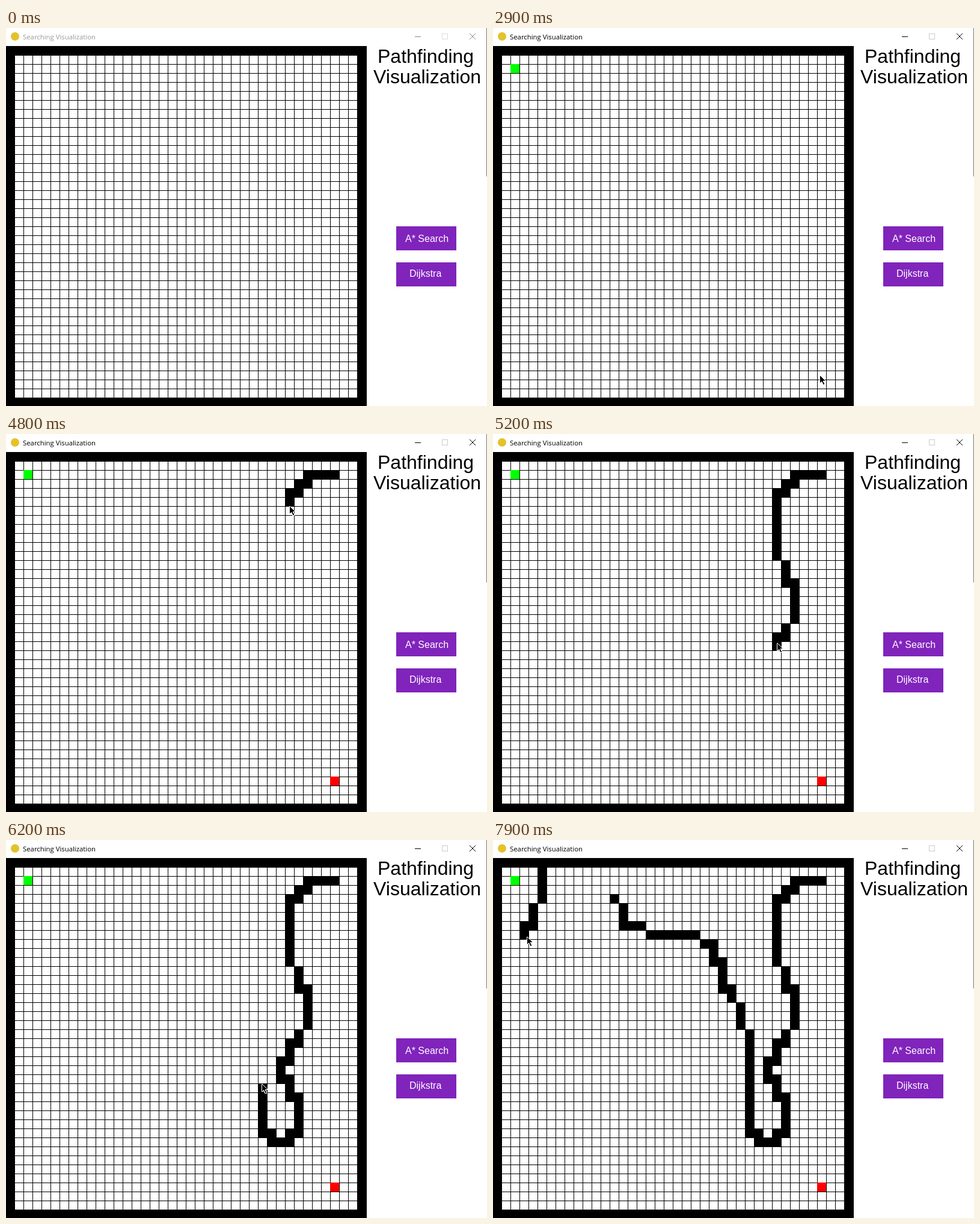
Write an HTML page that moves like this. It is 800 by 629 pixels and loops after 8000 ms.

```html
<!DOCTYPE html>
<html lang="en">
<head>
<meta charset="utf-8">
<title>Searching Visualization</title>
<style>
  html, body { margin: 0; width: 100%; height: 100%; overflow: hidden; background: #fff; }
  svg { display: block; }
  .bar { font: 11.35px "Open Sans", sans-serif; }
  .head { font: 32px "Liberation Sans", Arial, sans-serif; }
  .label { font: 16px "Liberation Sans", Arial, sans-serif; fill: #fff; }
  .crisp { shape-rendering: crispEdges; }
</style>
</head>
<body>
<svg width="800" height="629" viewBox="0 0 800 629">
  <rect width="800" height="629" fill="#fff"/>
  <circle cx="15" cy="14" r="7" fill="#e3c22c"/>
  <text id="title" class="bar" x="28" y="19">Searching Visualization</text>
  <path id="buttons" d="M680 14.5h10M771 9l10 10M781 9l-10 10" fill="none"/>
  <rect id="box" x="725.5" y="9.5" width="9" height="9" fill="none"/>
  <rect class="crisp" x="799" width="1" height="247" fill="#777"/>

  <g class="crisp">
    <rect y="30" width="600" height="599"/>
    <rect x="15" y="46" width="569" height="569" fill="#fff"/>
    <path id="grid"/>
    <rect id="start" x="29" y="60" width="15" height="15" fill="#0f0"/>
    <rect id="goal" x="539" y="570" width="15" height="15" fill="#f00"/>
    <path id="walls"/>
  </g>

  <text class="head" x="618" y="58">Pathfinding</text>
  <text class="head" x="611" y="92">Visualization</text>
  <g class="crisp" fill="#8024bc">
    <rect x="649" y="330" width="100" height="40"/>
    <rect x="649" y="390" width="100" height="40"/>
  </g>
  <text class="label" x="664" y="356">A* Search</text>
  <text class="label" x="671" y="414">Dijkstra</text>

  <path id="cursor" class="crisp" stroke="#fff" stroke-width="2" stroke-linejoin="round" paint-order="stroke"
    d="M1 .5V12h1v-1h1v-1h1v1h1v2h1v2h2v-2h-1v-2h-1v-2h3.5z"/>
</svg>
<script>
const LOOP = 8000, STEP = 100, SAMPLE = 4, CELL = 15, LEFT = -1, TOP = 30;
const $ = id => document.getElementById(id);
const set = (id, attrs) => {
  for (const k in attrs) $(id).setAttribute(k, attrs[k]);
};
const show = (id, on) => set(id, { visibility: on ? 'visible' : 'hidden' });
const box = (x, y, w, h) => `M${x} ${y}h${w}v${h}h${-w}z`;

let lines = '';
for (let i = 1; i <= 39; i++) {
  lines += box(LEFT + i * CELL, 45, 1, 570) + box(14, TOP + i * CELL, 570, 1);
}
set('grid', { d: lines });

// The pointer travels in legs, each a polyline in grid units that goes on
// from the one before. Moves ease in and out, pen strokes keep their speed.
const legs = [];
let last = [1.2, -2];
function leg(from, to, route, pen) {
  const pts = [last, ...route.split(' ').map(p => p.split(',').map(Number))];
  last = pts[pts.length - 1];
  legs.push({ from, to, pts, pen });
}
const move = (from, to, route) => leg(from, to, route, false);
const stroke = (from, to, route) => leg(from, to, route, true);

move(200, 700, '3.4,3');
move(1000, 1200, '2.8,2.6');
move(1600, 2500, '35.93,36.47');
move(2600, 2900, '36.27,36.53');
move(2900, 3500, '31.13,17.53');
move(3500, 4200, '29.4,11.2 31,6 36,3.33');
move(4300, 4400, '36.3,2.6');
stroke(4400, 4800, '33.3,2.75 31.6,4.7 31.47,5.97');
stroke(4800, 5200, '31.87,11.7 33.1,14.4 33.4,16.5 33.27,18.6 31.5,21.2');
stroke(5200, 5700, '30.8,22.7 30.7,23.6 32.4,26.9 32.8,29.5 31.13,31.33');
stroke(5700, 6200, '29.5,31.3 28.6,29.5 28.4,25.07');
stroke(6300, 6800, '28.13,19.4 26.9,15.7 25.8,14.1 24.8,11.2 24.4,9.6 23.27,9.04');
stroke(6800, 7200, '17.2,8.1 16.6,7.8 14.5,7.3 14.1,5.2 13.9,4.8');
move(7300, 7600, '5.4,1.1');
stroke(7600, 7900, '5.15,4.6 4.7,5.8 4.1,7.2 3.8,8.73');

// Point at share u of a polyline's length
function along(pts, u) {
  const dist = i => Math.hypot(pts[i][0] - pts[i - 1][0], pts[i][1] - pts[i - 1][1]);
  let left = 0;
  for (let i = 1; i < pts.length; i++) left += dist(i);
  left *= u;
  let i = 1;
  while (i < pts.length - 1 && left > dist(i)) left -= dist(i++);
  const k = Math.min(1, left / dist(i));
  return pts[i].map((v, axis) => pts[i - 1][axis] * (1 - k) + v * k);
}

function place({ from, to, pts, pen }, t) {
  const u = Math.min(1, (t - from) / (to - from));
  return along(pts, pen ? u : u * u * (3 - 2 * u));
}

// Every cell that the pen touches becomes a wall
const walls = new Map();
for (const l of legs.filter(l => l.pen)) {
  for (let t = l.from; t <= l.to; t += SAMPLE) {
    const [c, r] = place(l, t).map(Math.floor);
    const cell = box(LEFT + c * CELL, TOP + r * CELL, CELL, CELL);
    if (!walls.has(cell)) walls.set(cell, t);
  }
}

function draw(time) {
  const t = Math.floor(time / STEP) * STEP;
  const active = t >= 1500;
  set('title', { fill: active ? '#000' : '#999' });
  set('buttons', { stroke: active ? '#000' : '#888' });
  set('box', { stroke: active ? '#ccc' : '#ddd' });
  show('start', active);
  show('goal', t >= 3100);

  const built = [...walls].filter(([, born]) => born <= t);
  set('walls', { d: built.map(([cell]) => cell).join('') });

  show('cursor', t >= 300);
  const current = legs.filter(l => l.from <= t).pop();
  if (current) {
    const [x, y] = place(current, t);
    const px = Math.round(LEFT + x * CELL), py = Math.round(TOP + y * CELL);
    set('cursor', { transform: `translate(${px} ${py})` });
  }
}

const t0 = performance.now();
function tick() {
  draw((performance.now() - t0) % LOOP);
  requestAnimationFrame(tick);
}
draw(0);
requestAnimationFrame(tick);
</script>
</body>
</html>
```
